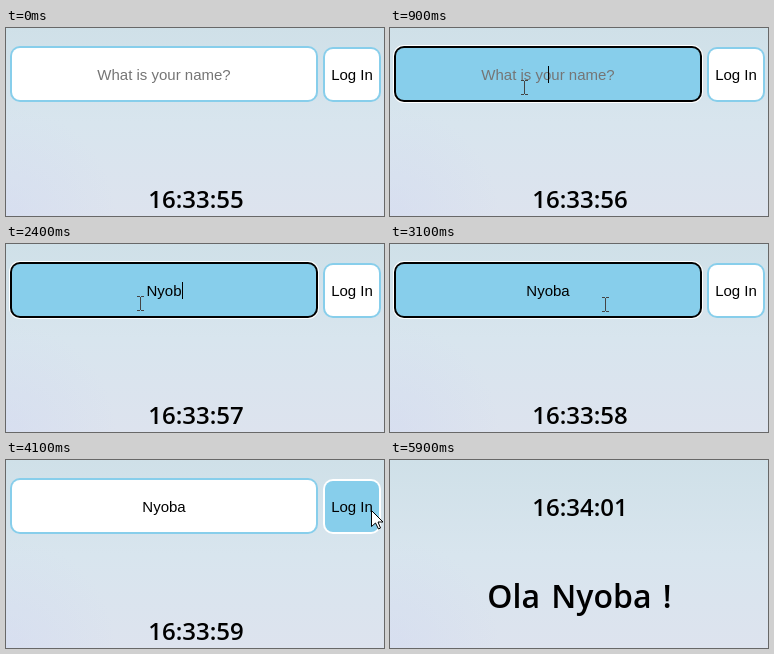
Animation, 378 px wide and 188 px high, one loop 6.7 s. Source, as an HTML page with a canvas:

```html
<!DOCTYPE html>
<html lang="en">
<head>
<meta charset="utf-8">
<title>Login clock</title>
<style>
  html, body { margin: 0; width: 100%; height: 100%; overflow: hidden; background: #d6e3ec; }
  canvas { display: block; width: 378px; height: 188px; }
</style>
</head>
<body>
<canvas id="stage" width="378" height="188"></canvas>
<script>
const ctx = document.getElementById('stage').getContext('2d');
const W = 378, H = 188, LOOP = 6700, STEP = 100;
const SKY = '#87ceeb';
const UI_FONT = '15px "Liberation Sans", Arial, sans-serif';
const NAME = 'Nyoba';

const FOCUS = 900, BLUR = 4000, GREET = 4200;
const FIELD_ENTER = 400, BUTTON_ENTER = 3200;
const KEY_TIMES = [1800, 2000, 2200, 2400, 2500];
const FIELD = { x: 4, y: 18, w: 308, h: 56 };
const BUTTON = { x: 317, y: 19, w: 58, h: 55 };

// time, x, y
const POINTER = [
  [100, 316, 168], [300, 278, 106], [400, 235, 68], [700, 140, 58], [800, 134, 59],
  [2900, 134, 59], [3000, 160, 60], [3200, 269, 60], [3300, 326, 56], [3500, 365, 50],
  [5200, 365, 50], [5300, 370, 56]
];

function pointerAt(t) {
  if (t < POINTER[0][0]) return null;
  for (let i = 1; i < POINTER.length; i++) {
    const [t0, x0, y0] = POINTER[i - 1], [t1, x1, y1] = POINTER[i];
    if (t <= t1) {
      const k = (t - t0) / (t1 - t0);
      return { x: Math.round(x0 + (x1 - x0) * k), y: Math.round(y0 + (y1 - y0) * k) };
    }
  }
  return null;
}

function clockText(t) {
  const s = 16 * 3600 + 33 * 60 + 55 + Math.floor((t + 100) / 1000);
  return [s / 3600, s / 60 % 60, s % 60]
    .map(n => String(Math.floor(n)).padStart(2, '0')).join(':');
}

function text(str, x, y, font, color, wordSpacing = 0) {
  ctx.font = font;
  ctx.wordSpacing = `${wordSpacing}px`;
  ctx.fillStyle = color;
  ctx.textAlign = 'center';
  ctx.fillText(str, x, y);
}

const heading = size => `600 ${size}px "Open Sans", "Noto Sans", sans-serif`;

function background() {
  const sky = ctx.createLinearGradient(0, 0, 0, H);
  sky.addColorStop(0, '#cfe0e8');
  sky.addColorStop(0.5, '#d8e5ee');
  sky.addColorStop(1, '#dde3ee');
  ctx.fillStyle = sky;
  ctx.fillRect(0, 0, W, H);
  const haze = ctx.createRadialGradient(0, H, 0, 0, H, 110);
  haze.addColorStop(0, 'rgba(207,216,242,0.4)');
  haze.addColorStop(1, 'rgba(207,216,242,0)');
  ctx.fillStyle = haze;
  ctx.fillRect(0, 0, W, H);
}

function roundBox(b, inset, radius) {
  ctx.beginPath();
  ctx.roundRect(b.x + inset, b.y + inset, b.w - 2 * inset, b.h - 2 * inset, radius);
}

function box(b, hover, focused) {
  if (focused) {
    roundBox(b, -1, 11);
    ctx.fillStyle = '#fff';
    ctx.fill();
  }
  roundBox(b, 0, 10);
  ctx.fillStyle = focused ? '#000' : hover ? '#fff' : SKY;
  ctx.fill();
  roundBox(b, 2, 8);
  ctx.fillStyle = hover ? SKY : '#fff';
  ctx.fill();
}

function caretVisible(t) {
  if (t < FOCUS || t >= BLUR) return false;
  const lastInput = KEY_TIMES.filter(k => k <= t).pop() || FOCUS;
  return Math.floor((t - lastInput) / 500) % 2 === 0;
}

function loginForm(t) {
  box(FIELD, t >= FIELD_ENTER && t < BUTTON_ENTER, t >= FOCUS && t < BLUR);
  box(BUTTON, t >= BUTTON_ENTER, false);
  text('Log In', 346, 52, UI_FONT, '#000');

  const typed = NAME.slice(0, KEY_TIMES.filter(k => k <= t).length);
  text(typed || 'What is your name?', 158, 52, UI_FONT, typed ? '#000' : '#757575');
  if (caretVisible(t)) {
    const x = Math.round(158 + (typed ? ctx.measureText(typed).width / 2 : 0));
    ctx.fillStyle = '#000';
    ctx.fillRect(x, 38, 1, 17);
  }
}

function iBeam(x, y) {
  ctx.fillStyle = '#444';
  ctx.fillRect(x, y - 6, 1, 13);
  for (const dy of [-7, 7]) {
    ctx.fillRect(x - 3, y + dy, 3, 1);
    ctx.fillRect(x + 1, y + dy, 3, 1);
  }
}

function arrow(x, y) {
  const shape = [[0, 0], [0, 16], [4, 12.5], [7, 18.5], [9, 17.5], [6.5, 11.5], [11.5, 11.5]];
  ctx.beginPath();
  for (const [dx, dy] of shape) ctx.lineTo(x + dx + 0.5, y + dy + 0.5);
  ctx.closePath();
  ctx.fillStyle = '#fff';
  ctx.fill();
  ctx.strokeStyle = '#000';
  ctx.lineWidth = 1;
  ctx.stroke();
}

function draw(t) {
  background();
  const greeted = t >= GREET;
  if (greeted) text(`Ola ${NAME} !`, 189.5, 148, heading(32), '#000', 3);
  else loginForm(t);
  text(clockText(t), 190, greeted ? 56 : 180, heading(24), '#000');

  const p = pointerAt(t);
  const overField = t >= FIELD_ENTER && t <= BUTTON_ENTER;
  if (p) (overField ? iBeam : arrow)(p.x, p.y);
}

function tick() {
  const t = performance.now() % LOOP;
  draw(Math.floor(t / STEP) * STEP);
  requestAnimationFrame(tick);
}
tick();
</script>
</body>
</html>
```
